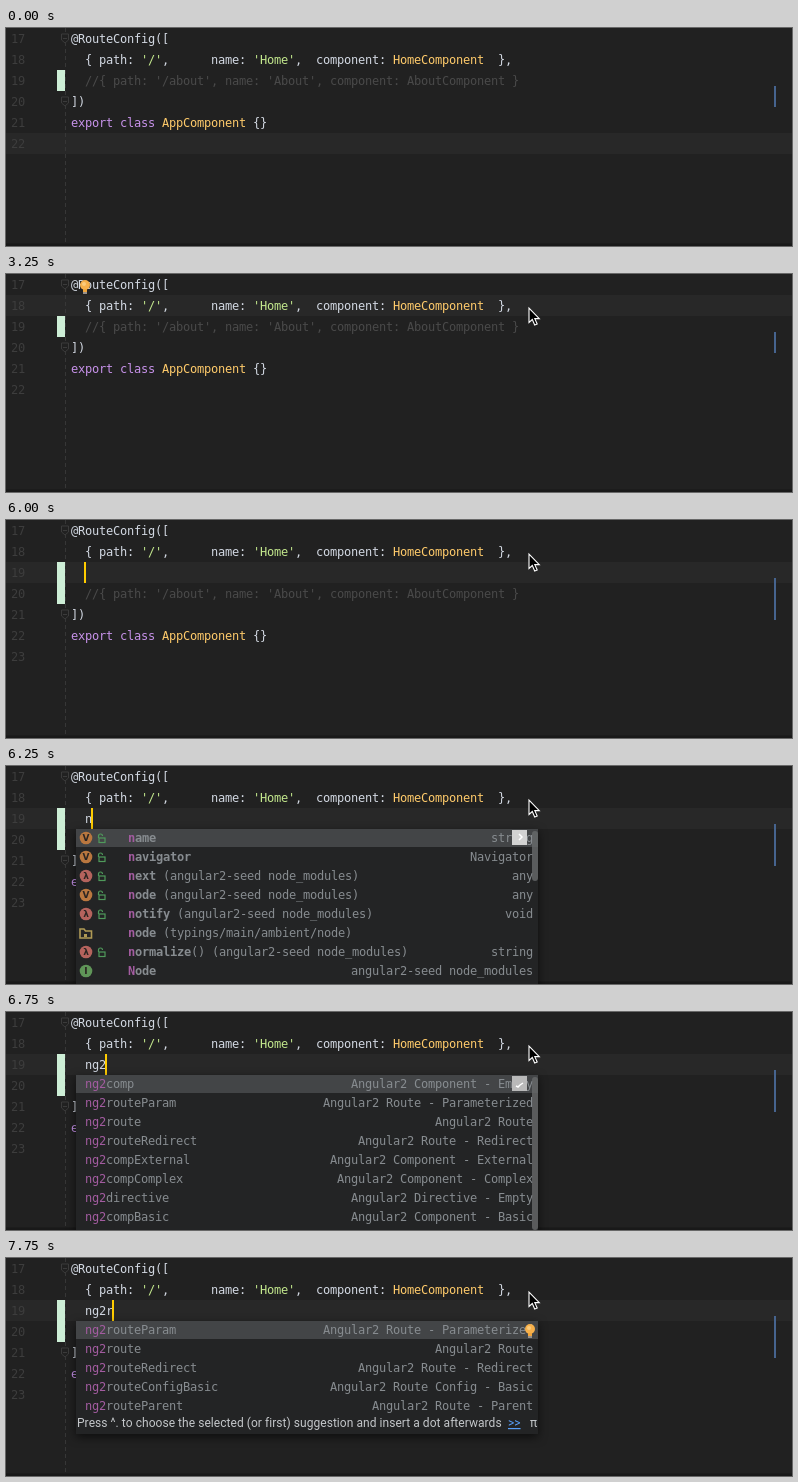
An HTML page for the animation above (8000 ms loop, 786 by 218 pixels).

```html
<!DOCTYPE html>
<html lang="en">
<head>
<meta charset="utf-8">
<title>Code completion</title>
<style>
html, body { margin: 0; width: 786px; height: 218px; overflow: hidden; background: #212121; }
svg { display: block; }
text { font: 12px "DejaVu Sans Mono", monospace; letter-spacing: -.224px; fill: #d3d9e3; white-space: pre; }
.num { fill: #3d3d3d; }
.com { fill: #4a4a4a; }
.str { fill: #c3e88d; }
.cls { fill: #ffcb6b; }
.key { fill: #c792ea; }
.dim { fill: #878c90; }
.name { fill: #878c90; font-weight: bold; }
.hit { fill: #a35ca0; font-weight: bold; }
.pre { fill: #a35ca0; }
.end { text-anchor: end; fill: #878c90; }
.hint { font: 12px Roboto, sans-serif; letter-spacing: .05px; fill: #c4c7ca; }
.link { font: 12px Roboto, sans-serif; letter-spacing: 0; fill: #589df6; text-decoration: underline; }
.icon { font: bold 9px "DejaVu Sans", sans-serif; letter-spacing: 0; fill: #2b2522; text-anchor: middle; }
.pop { filter: drop-shadow(0 3px 5px #0009); }
</style>
</head>
<body>
<svg id="stage" width="786" height="218" viewBox="0 0 786 218"></svg>
<script>
const LOOP = 8000, LINE = 21, ROW = 19, LEFT = 65, COL = 7;
const stage = document.getElementById('stage');

const esc = s => s.replace(/&/g, '&amp;').replace(/</g, '&lt;').replace(/>/g, '&gt;').replace(/ /g, '\u00a0');
const rect = (x, y, w, h, fill, more = '') => `<rect x="${x}" y="${y}" width="${w}" height="${h}" fill="${fill}" ${more}/>`;
const text = (x, y, cls, s) => `<text x="${x}" y="${y}" class="${cls}">${esc(s)}</text>`;
// parts: class, string, class, string, ...
const rich = (x, y, parts) => {
  let out = '';
  for (let i = 0; i < parts.length; i += 2) out += `<tspan class="${parts[i]}">${esc(parts[i + 1])}</tspan>`;
  return `<text x="${x}" y="${y}">${out}</text>`;
};

const head = [
  ['', '@RouteConfig(['],
  ['', '  { path: ', 'str', "'/'", '', ',      name: ', 'str', "'Home'", '', ',  component: ', 'cls', 'HomeComponent', '', '  },']
];
const tail = [
  ['com', "  //{ path: '/about', name: 'About', component: AboutComponent }"],
  ['', '])'],
  ['key', 'export class ', 'cls', 'AppComponent', '', ' {}'],
  ['', '']
];

// icon | name with *match* | details | type
const symbols = {
  n: [
    'V|*n*ame||string', 'V|*n*avigator||Navigator', 'λ|*n*ext| (angular2-seed node_modules)|any',
    'V|*n*ode| (angular2-seed node_modules)|any', 'λ|*n*otify| (angular2-seed node_modules)|void',
    'F|*n*ode| (typings/main/ambient/node)|', 'λ|*n*ormalize|() (angular2-seed node_modules)|string',
    'I|*N*ode||angular2-seed node_modules'
  ],
  ng: [
    'V|offscreenBufferi*ng*| (angular2-seed node_modules)|', 'V|onplayi*ng*|([Event] ev)|any',
    'V|onseeki*ng*|([Event] ev)|any', 'V|onwaiti*ng*|([Event] ev)|any',
    'λ|pendi*ng*|([string, optional] reason) (jasmine.d.ts, typ|void',
    'F|testi*ng*| (selenium-webdriver.d.ts, typings/main/ambient/sel|',
    'λ|toStri*ng*|() (angular2-seed node_modules)|string',
    'I|_ChainSi*ng*le||angular2-seed node_modules'
  ]
};
// abbreviation | description
const templates = {
  ng2: [
    'comp|Component - Empty', 'routeParam|Route - Parameterized', 'route|Route', 'routeRedirect|Route - Redirect',
    'compExternal|Component - External', 'compComplex|Component - Complex', 'directive|Directive - Empty', 'compBasic|Component - Basic'
  ],
  ng2r: [
    'routeParam|Route - Parameterized', 'route|Route', 'routeRedirect|Route - Redirect',
    'routeConfigBasic|Route Config - Basic', 'routeParent|Route - Parent'
  ]
};

function icon(kind, y) {
  if (kind === 'F')
    return `<path d="M74 ${y - 4}h4l1.5 2h6v7h-11.5z" fill="none" stroke="#b09a55" stroke-width="1.6"/>` + rect(78, y + 1, 3, 3, '#b09a55');
  const fill = { V: '#b9773f', 'λ': '#b5635d', I: '#5f9558' }[kind];
  const lock = kind === 'I' ? '' :
    `<path d="M92.5 ${y}v-2a2 2 0 0 1 4 0" fill="none" stroke="#4f9a5b" stroke-width="1.2"/>` +
    `<rect x="93" y="${y}" width="6" height="4.5" fill="none" stroke="#4f9a5b" stroke-width="1.2"/>`;
  return `<circle cx="80" cy="${y}" r="6.3" fill="${fill}"/>` + text(80, y + 3.3, 'icon', kind) + lock;
}

function symbolRow(row, i) {
  const [kind, name, info, type] = row.split('|'), [a, hit, b] = name.split('*'), y = 72 + i * ROW;
  return icon(kind, y) + rich(122, y + 4, ['name', a, 'hit', hit, 'name', b, 'dim', info]) + text(527, y + 4, 'end', type);
}

function templateRow(row, i) {
  const [name, info] = row.split('|'), y = 76 + i * ROW;
  return rich(79, y, ['pre', 'ng2', 'dim', name]) + text(527, y, 'end', 'Angular2 ' + info);
}

function popup(typed, t) {
  const short = typed === 'ng2r', isSymbol = typed in symbols;
  let out = rect(70, 63, 462, short ? 113 : 170, '#232425', 'class="pop"') + rect(70, 63, 462, 18, '#434547');
  out += '<svg width="527" height="218">' +
    (isSymbol ? symbols[typed].map(symbolRow) : templates[typed].map(templateRow)).join('') + '</svg>';
  if (short)
    return out + text(71, 169, 'hint', 'Press ^. to choose the selected (or first) suggestion and insert a dot afterwards') +
      text(502, 169, 'link', '>>') + text(524, 169, 'hint', 'π');
  if (t < 7000) {
    out += rect(526, 65, 6, isSymbol ? 50 : 153, '#686a6b', 'rx="3" opacity=".8"');
    out += rect(506, 64, 15, 15, isSymbol ? '#d2d2d2' : '#b9b9b9');
    out += `<path d="${isSymbol ? 'M513 68l3 3-3 3' : 'M510 74l2 1 2-2 3-2'}" fill="none" stroke="#fff" stroke-width="1.5"/>`;
  }
  return out;
}

const bulb = (x, y) => `<circle cx="${x}" cy="${y}" r="5" fill="#f6b04b"/><circle cx="${x - 1}" cy="${y - 1}" r="2" fill="#fbcb7c"/>` +
  rect(x - 2, y + 4, 4, 3, '#f0a53c') + rect(x - 2, y + 7, 4, 2, '#98918a');

const fold = y => `<path d="M55.5 ${y - 4.5}h7v6l-3.5 3-3.5-3zM57 ${y}h4" fill="#212121" stroke="#3b3b3b"/>`;

const mousePath = [[2250, 522, 33], [2000, 523, 33], [1750, 524, 31], [1000, 525, 49], [500, 414, 30]];
function mouse(t) {
  const p = mousePath.find(m => t >= m[0]);
  return p ? `<path transform="translate(${p[1] + 1} ${p[2] + 1})" d="M0 0V14.5L3.3 11.5L5.7 17L8.2 16L5.8 10.6H10.3Z" fill="#000" stroke="#fff" stroke-width="1.1"/>` : '';
}

function draw(t) {
  const added = t >= 3750;
  const typed = t < 6250 ? '' : t < 6500 ? 'n' : t < 6750 ? 'ng' : t < 7250 ? 'ng2' : 'ng2r';
  const lines = added ? [...head, ['', '  ' + typed], ...tail] : [...head, ...tail];
  const current = added ? 2 : t >= 2500 ? 1 : 5;
  const changed = added ? 42 : 21;

  let out = rect(0, 0, 786, 218, '#212121') + rect(0, current * LINE, 786, LINE, '#282828');
  out += '<path d="M59.5 0V216" stroke="#373737" stroke-dasharray="4 3"/>';
  out += fold(10.5) + fold(added ? 94.5 : 73.5);
  out += rect(51, 42, 8, changed, '#cdeed6') + rect(768, 58, 2, changed, '#46648f');
  out += rect(0, 215.5, 786, 2.5, '#191919');
  lines.forEach((parts, i) => {
    const y = i * LINE + 15;
    out += text(5, y, 'num', String(17 + i)) + rich(LEFT, y, parts);
  });

  let col = -1;
  if (t >= 2500 && t < 3250) col = 63;
  if (added && (typed || (t - 3750 < 750) || (t >= 5000 && t < 5500) || t >= 6000)) col = 2 + typed.length;
  if (col >= 0) out += rect(LEFT + col * COL - 1, current * LINE, 2, LINE, '#ffcc00');

  if (t >= 3250 && t < 3750) out += bulb(79, 11);
  if (typed) out += popup(typed, t);
  if (t >= 7750) out += bulb(524, 71);
  return out + mouse(t);
}

let last = -1;
function tick(now) {
  const step = Math.floor(now % LOOP / 250) * 250;
  if (step !== last) stage.innerHTML = draw(last = step);
  requestAnimationFrame(tick);
}
tick(performance.now());
</script>
</body>
</html>
```
